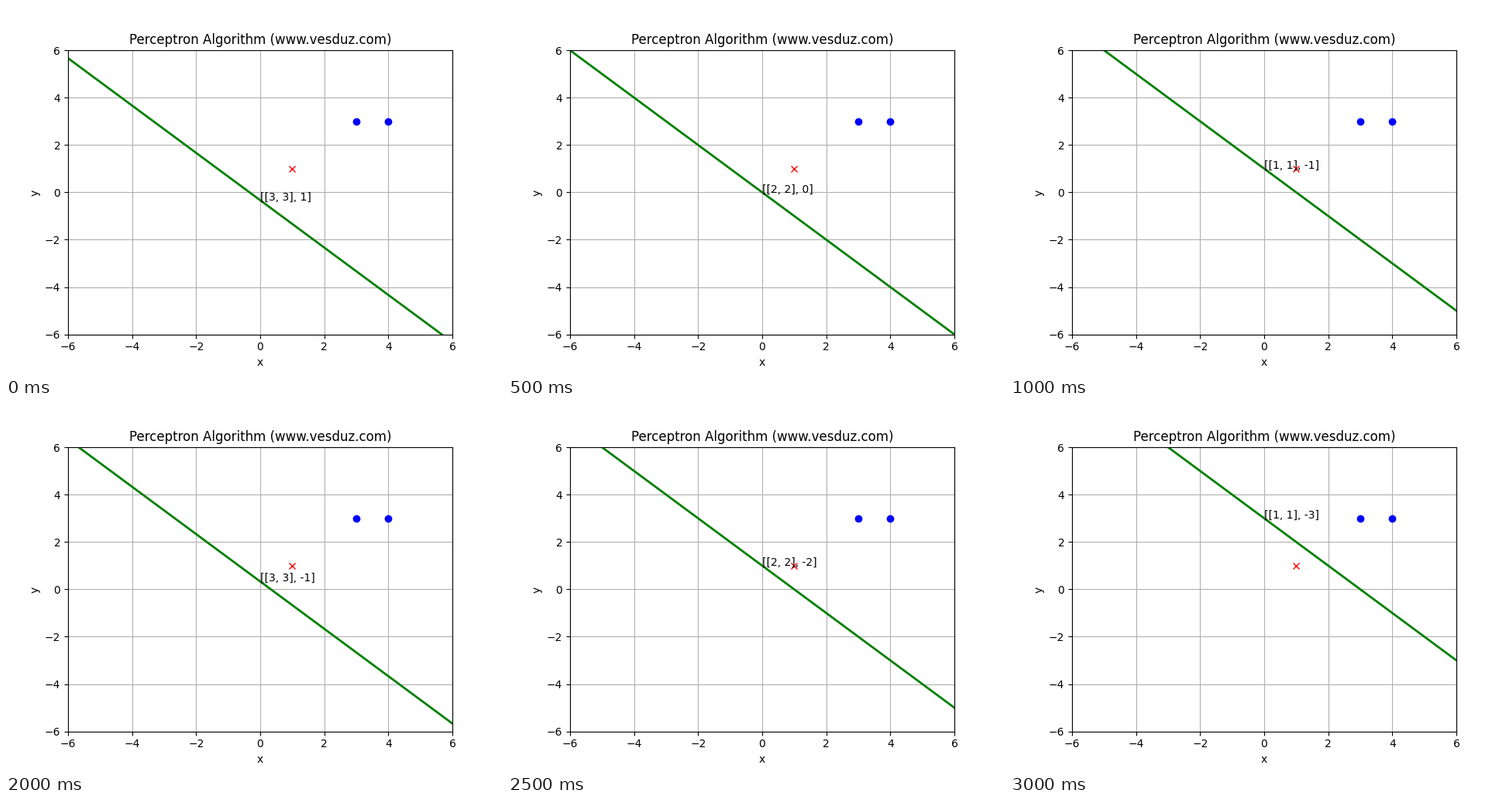
A matplotlib script for the animation above (3.5 s loop, 640 by 476 pixels).

```python
import matplotlib.pyplot as plt
from matplotlib.animation import FuncAnimation

SAMPLES = [((3, 3), 1), ((4, 3), 1), ((1, 1), -1)]
LIMIT = 6
REACH = 7


def train(samples):
    """Return (weights, bias) after every perceptron update."""
    w, b = [0, 0], 0
    history = []
    while True:
        wrong = next(((p, label) for p, label in samples
                      if label * (w[0] * p[0] + w[1] * p[1] + b) <= 0), None)
        if wrong is None:
            return history
        p, label = wrong
        w = [w[0] + label * p[0], w[1] + label * p[1]]
        b += label
        history.append((w, b))


def drawable(history):
    """Keep the previous boundary wherever the weights define no line."""
    shown = []
    for w, b in history:
        shown.append((w, b) if w[1] else shown[-1])
    return shown


steps = drawable(train(SAMPLES))

plt.rcParams["font.family"] = "DejaVu Sans"
fig, ax = plt.subplots(figsize=(6.4, 4.76), dpi=100)
ax.set(xlim=(-LIMIT, LIMIT), ylim=(-LIMIT, LIMIT), xlabel="x", ylabel="y")
ax.set_title("Perceptron Algorithm (www.vesduz.com)")
ax.grid(True)

boundary, = ax.plot([], [], "g", lw=2)
for sign, style in ((1, "bo"), (-1, "rx")):
    xs, ys = zip(*(p for p, label in SAMPLES if label == sign))
    ax.plot(xs, ys, style)
caption = ax.text(0, 0, "")


def update(i):
    w, b = steps[i]
    xs = (-REACH, REACH)
    boundary.set_data(xs, [-(b + w[0] * x) / w[1] for x in xs])
    caption.set_position((0, -b / w[1]))
    caption.set_text(str([w, b]))
    return boundary, caption


anim = FuncAnimation(fig, update, frames=len(steps), interval=500, repeat=True)
plt.show()
```
